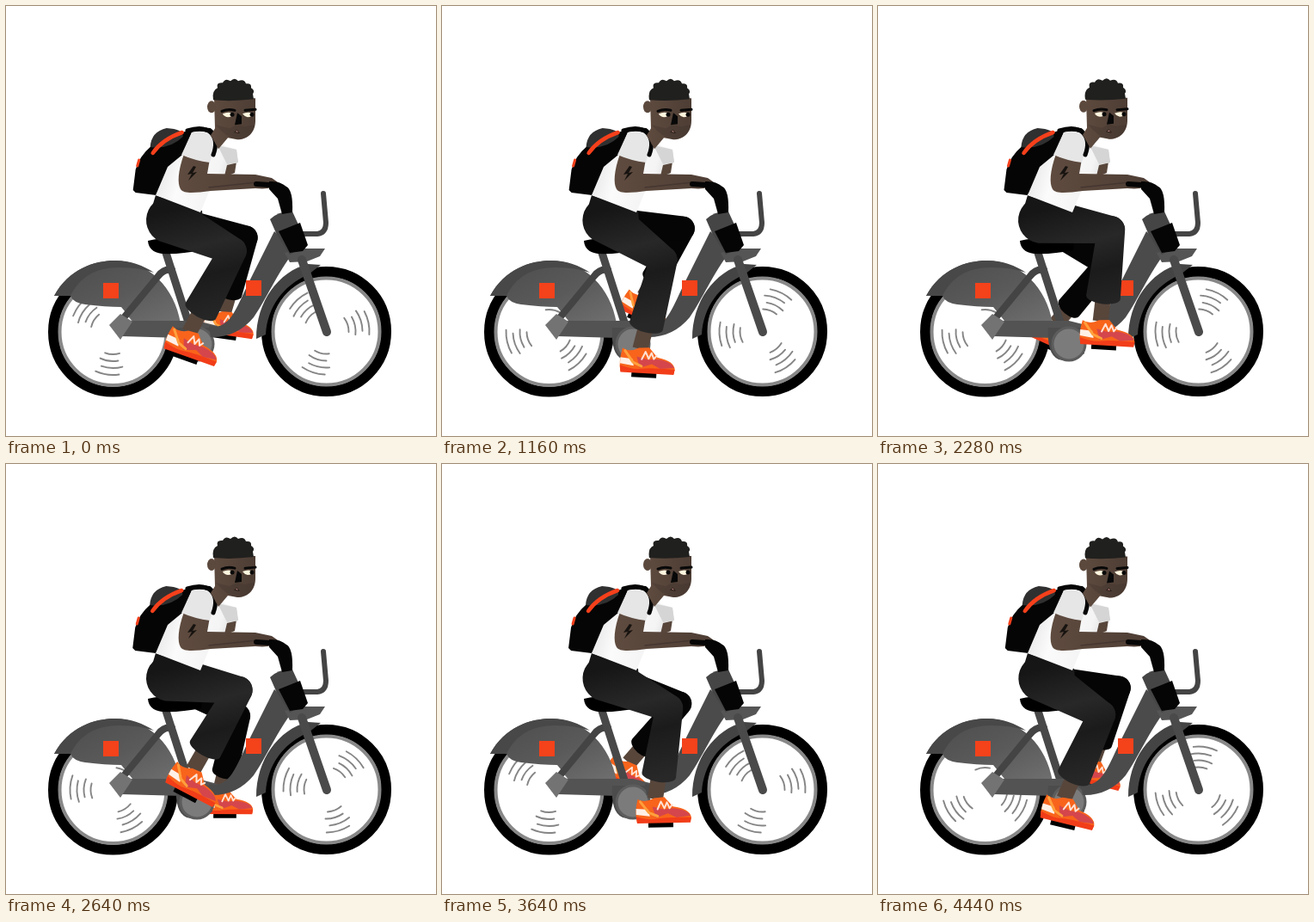
Recreate the animation shown at these times as an HTML page. Size 500x500 px, loop 4.48 s.

```html
<!DOCTYPE html>
<html lang="en">
<head>
<meta charset="utf-8">
<title>Cyclist</title>
<style>
html, body { margin: 0; width: 100%; height: 100%; overflow: hidden; background: #fff; }
svg { display: block; width: 100vw; height: 100vh; }
</style>
</head>
<body>
<svg viewBox="0 0 500 500" fill="none" stroke-linecap="round" stroke-linejoin="round">
  <defs>
    <linearGradient id="cloth" gradientUnits="userSpaceOnUse" x1="200" y1="235" x2="235" y2="370">
      <stop offset="0" stop-color="#161616"/><stop offset=".35" stop-color="#282828"/>
      <stop offset=".6" stop-color="#1b1b1b"/><stop offset="1" stop-color="#282828"/>
    </linearGradient>
    <linearGradient id="guard" x1="0" y1="0" x2="1" y2="1">
      <stop offset="0" stop-color="#4b4b4b"/><stop offset=".55" stop-color="#5a5a5a"/><stop offset="1" stop-color="#707070"/>
    </linearGradient>
    <linearGradient id="shirt" x1="0" y1=".3" x2="1" y2=".6">
      <stop offset="0" stop-color="#e2e2e2"/><stop offset=".35" stop-color="#fbfbfb"/>
      <stop offset=".75" stop-color="#f4f4f4"/><stop offset="1" stop-color="#d6d6d6"/>
    </linearGradient>
    <linearGradient id="skin" x1="0" y1="0" x2="1" y2="0">
      <stop offset="0" stop-color="#5f4b3f"/><stop offset="1" stop-color="#4d3d34"/>
    </linearGradient>
    <g id="wheel">
      <circle r="69.5" stroke="#000" stroke-width="12"/>
      <circle r="62" stroke="#888" stroke-width="4"/>
    </g>
    <g id="shoe">
      <path d="M-15-3H14V3H-15Z" fill="#000"/>
      <path d="M-27-30Q-18-25-8-31L4-32 14-21Q34-18 35-8L34-3H-28Q-31-14-27-30Z" fill="#f8641b"/>
      <path d="M-29-19-15-18-13-10-29-12Z" fill="#fff0e6"/>
      <path d="M-10-21 3-18 14-19Q31-17 34-10L18-8 8-13-6-8Z" fill="#d4464c"/>
      <path d="M-29-10Q-14-5-4-7T35-8L34-2H-28Z" fill="#f23d19"/>
      <path d="M-4-18 0-27 4-19 7-26 10-19 13-23" stroke="#ffe1d4" stroke-width="2"/>
      <path d="M-24-27-14-14-4-10" stroke="#ffa03c" stroke-width="3"/>
    </g>
  </defs>

  <use href="#wheel" x="124.5" y="379"/>
  <use href="#wheel" x="372.5" y="378.5"/>
  <path class="spin" stroke="#858585" stroke-width="1.9"/>
  <path class="spin" stroke="#858585" stroke-width="1.9"/>

  <g class="leg"></g>

  <g id="bike">
    <path d="M56 337C73 306 102 296 127 296C166 297 196 327 203 369L147 366 134 350Q116 350 92 347 78 345 75 337Q66 336 56 337Z" fill="url(#guard)"/>
    <path d="M56 337C73 306 102 296 127 296C145 296 160 302 172 310Q156 304 132 304C104 304 86 315 75 337Z" fill="#484848"/>
    <path d="M134 366 177 314Q184 305 193 307" stroke="#444" stroke-width="8"/>
    <path d="M186 287 214 374" stroke="#484848" stroke-width="9"/>
    <path d="M134 366H222L246 372 240 386H205L134 384Z" fill="#535353"/>
    <path d="M120 371 133 358 147 367 133 388Z" fill="#737373"/>
    <path d="M198 374H240V404Q226 416 210 411 196 405 198 374Z" fill="#4c4c4c"/>
    <circle cx="222" cy="393" r="19" fill="#7b7b7b" stroke="#5c5c5c" stroke-width="3"/>
    <path d="M312 262 336 284C315 311 302 342 288 362Q268 386 238 385L236 372C261 378 268 350 284 318Z" fill="#4b4b4b"/>
    <path d="M291 387C291 343 317 309 351 300L366 301 352 312C322 325 304 350 302 382Z" fill="#444"/>
    <path d="M324 287 346 282 371 282 365 291 350 297 330 298Z" fill="#555"/>
    <path d="M344 295 373 379" stroke="#4a4a4a" stroke-width="10"/>
    <path d="M345 265H362Q372 264 372 252L369 218" stroke="#444" stroke-width="6"/>
    <path d="M307 248Q317 238 333 239L339 252 350 278 330 289 314 264Z" fill="#454545"/>
    <path d="M317 262 342 252 351 278 345 285 330 287Z" fill="#050505"/>
    <path d="M113 322h18v18h-18Z M279 319h18v18h-18Z" fill="#f4421b"/>
    <path d="M165 273Q190 267 228 272L227 284Q203 289 181 288 166 286 165 273Z" fill="#000"/>
  </g>

  <g class="leg"></g>

  <g id="torso">
    <path d="M253 182 268 181 266 194 254 199Z" fill="#58463b"/>
    <g id="pack">
      <path d="M147 214 150 190Q155 174 167 164 180 152 202 148 222 140 237 142C248 150 246 165 240 174L206 178 174 220 150 217Z" fill="#050505"/>
      <path d="M167 164Q168 146 186 142 206 143 205 152 190 167 167 164Z" fill="#303030"/>
      <path d="M170 171Q181 155 204 147" stroke="#f5401b" stroke-width="4.5"/>
      <path d="M154 179 152 186" stroke="#f5401b" stroke-width="3"/>
    </g>
    <path d="M216 147Q230 143 243 151L255 163 268 167 270 182 257 185 252 206 236 216 226 240 174 220 188 187 205 173Z" fill="url(#shirt)"/>
    <path d="M246 162 268 167 270 182 257 184Z" fill="#d5d5d5"/>
    <path d="M207 172C200 192 199 206 203 213C207 219 221 217 238 215L290 212Q309 214 319 207L309 200 290 196 234 195 237 178Z" fill="url(#skin)"/>
    <path d="M236 211 292 205" stroke="#443630" stroke-width="1.5"/>
    <path d="M216 147Q232 143 242 154 242 169 237 182 220 180 204 173Z" fill="#e6e6e6"/>
    <path d="M211 145Q230 139 239 148 247 157 241 173" stroke="#050505" stroke-width="5"/>
    <path d="M218 186 211 196 216 195 212 203 222 193 217 194 221 187Z" fill="#171310"/>
  </g>

  <path d="M306 204Q318 203 326 210 334 214 333 240L321 242 316 224 306 213Z" fill="#050505"/>
  <path d="M291 207 306 208" stroke="#050505" stroke-width="6"/>

  <g id="head">
    <path d="M242 107H290V133C290 147 281 155 269 155L258 153 247 166 238 150 243 142Z" fill="url(#skin)"/>
    <path d="M244 138Q256 153 269 155C281 155 288 147 289 138L278 140 268 138 260 142Z" fill="#3d312b" opacity=".35"/>
    <ellipse cx="239" cy="117" rx="5" ry="7" fill="#5c493d"/>
    <path d="M241 109Q239 98 246 95 244 88 252 89 255 83 261 87 266 82 270 87 277 84 279 90 286 89 285 95 290 98 287 102L288 108Q263 111 241 109Z" fill="#20201e"/>
    <path d="M251 122Q258 119 266 121M278 121 290 120" stroke="#080808" stroke-width="3"/>
    <path d="M252 125Q259 122 265 125 263 129 258 129 253 128 252 125ZM275 125Q282 122 288 125 286 129 281 129 277 128 275 125Z" fill="#fff6df"/>
    <circle cx="263" cy="126" r="2.5" fill="#080808"/><circle cx="286" cy="126" r="2.5" fill="#080808"/>
    <path d="M269 124 274 128 274 137 266 138Z" fill="#080808"/>
    <path d="M266 146 268.500 144 271 147Z" fill="#b38379" stroke="#2a1d19"/>
  </g>
</svg>
<script>
const STEP = 40, FRAMES = 112, TURN = 2 * Math.PI, RAD = TURN / 360;
const $ = s => document.querySelector(s);
const legs = [...document.querySelectorAll('.leg')];
const spins = [...document.querySelectorAll('.spin')];
const WHEEL_TURNS = -16;
const wheels = [
  { x: 124.5, y: 379, phase: 95 },
  { x: 372.5, y: 378.5, phase: 105 }
];
const far = { hip: [202, 255], bones: [78, 88], r: [20, 14, 15], axle: 229, size: .92, cloth: '#050505', lag: Math.PI };
const near = { hip: [190, 249], bones: [82, 104], r: [27, 16, 20], axle: 235, size: 1, cloth: 'url(#cloth)', lag: 0 };

const pt = (x, y) => x.toFixed(2) + ' ' + y.toFixed(2);
const mix = (p, q, k) => [p[0] + (q[0] - p[0]) * k, p[1] + (q[1] - p[1]) * k];

// Three groups of speed lines, 120 degrees apart.
let arcs = '';
for (let g = 0; g < 3; g++) {
  [26, 34, 42, 50].forEach((r, i) => {
    const mid = g * 120 + (i % 2 ? 3 : -3), half = 19 - i;
    const at = d => pt(r * Math.cos(d * RAD), r * Math.sin(d * RAD));
    arcs += `M${at(mid - half)}A${r} ${r} 0 0 1 ${at(mid + half)}`;
  });
}
spins.forEach(s => s.setAttribute('d', arcs));

// Tapered limb whose far end bulges by e.
function limb(p, r, q, s, e) {
  const dx = q[0] - p[0], dy = q[1] - p[1], d = Math.hypot(dx, dy);
  const nx = -dy / d, ny = dx / d, tilt = Math.atan2(dy, dx) / RAD;
  const edge = (c, k) => pt(c[0] + nx * k, c[1] + ny * k);
  return `M${edge(p, r)}L${edge(q, s)}A${e} ${s} ${tilt} 0 0 ${edge(q, -s)}L${edge(p, -r)}A${r} ${r} 0 0 0 ${edge(p, r)}Z`;
}

function bend(hip, ankle, [thigh, shin]) {
  const dx = ankle[0] - hip[0], dy = ankle[1] - hip[1], d = Math.hypot(dx, dy);
  const a = Math.atan2(dy, dx) - Math.acos((thigh * thigh + d * d - shin * shin) / (2 * thigh * d));
  return [hip[0] + thigh * Math.cos(a), hip[1] + thigh * Math.sin(a)];
}

function leg({ hip, bones, r, axle, size, cloth, lag }, crank) {
  const a = crank + lag;
  const px = axle + 28 * Math.cos(a), py = 397 + 32 * Math.sin(a);
  const pitch = 14 - 15 * Math.cos(a - Math.PI / 4);
  const c = Math.cos(pitch * RAD) * size, s = Math.sin(pitch * RAD) * size;
  const ankle = [px - 6 * c + 33 * s, py - 6 * s - 33 * c];
  const knee = bend(hip, ankle, bones);
  const cuff = mix(knee, ankle, .76);
  return `<path d="M${pt(...cuff)}L${pt(...mix(knee, ankle, 1.03))}" stroke="#58463b" stroke-width="18" stroke-linecap="butt"/>
    <use href="#shoe" transform="translate(${pt(px, py)}) rotate(${pitch.toFixed(2)}) scale(${size})"/>
    <path fill="${cloth}" d="${limb(knee, r[1], cuff, r[2], 8)}"/>
    <path fill="${cloth}" d="${limb(hip, r[0], knee, r[1], r[1])}"/>`;
}

const waist = '<path d="M174 220L228 238 230 262 190 262 168 240Z" fill="url(#cloth)"/>';

function draw(now) {
  const f = Math.floor(now / STEP) % FRAMES;
  const crank = 157 * RAD + f / 16 * TURN;
  legs[0].innerHTML = leg(far, crank);
  legs[1].innerHTML = leg(near, crank) + waist;
  wheels.forEach((w, i) => spins[i].setAttribute('transform',
    `translate(${w.x} ${w.y}) rotate(${w.phase + WHEEL_TURNS * 360 * f / FRAMES})`));
  const sway = Math.cos(crank - 130 * RAD);
  $('#pack').setAttribute('transform', `translate(${sway * .8} 0)`);
  $('#head').setAttribute('transform', `translate(0 ${sway * .4})`);
  requestAnimationFrame(draw);
}
requestAnimationFrame(draw);
</script>
</body>
</html>
```
